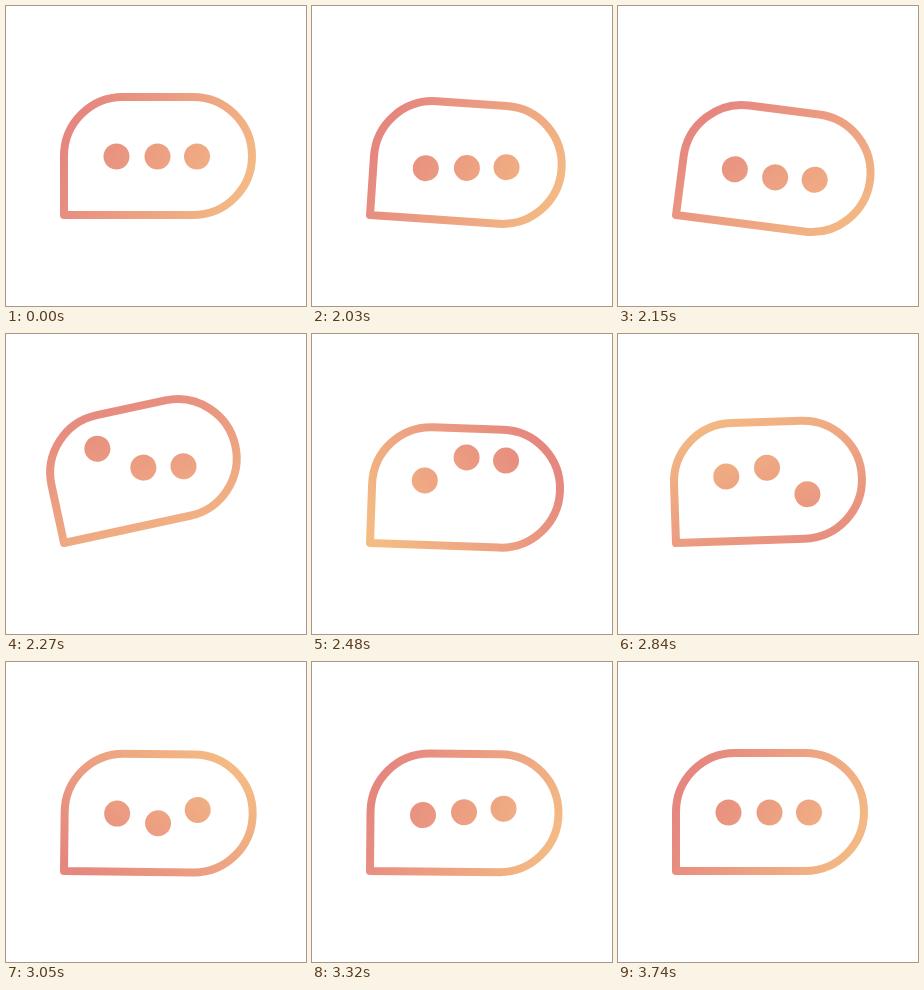
Animation of 300x300 px, one loop 3830 ms. Source, as an HTML page:

```html
<!DOCTYPE html>
<html lang="en">
<head>
<meta charset="utf-8">
<title>Chat bubble</title>
<style>
  html, body { margin: 0; width: 100%; height: 100%; overflow: hidden; background: #fff; }
  svg { display: block; width: 100vw; height: 100vh; }
</style>
</head>
<body>
<svg viewBox="0 0 300 300">
  <defs>
    <linearGradient id="tone" gradientUnits="userSpaceOnUse" x1="57" y1="160" x2="247" y2="160">
      <stop offset="0" stop-color="#e5867f"/>
      <stop offset="1" stop-color="#f4bb84"/>
    </linearGradient>
  </defs>
  <g id="bubble" fill="url(#tone)">
    <path d="M58 209V150A59 59 0 0 1 117 91H187A59 59 0 0 1 187 209Z"
          fill="none" stroke="url(#tone)" stroke-width="8" stroke-linejoin="round"/>
    <circle class="dot" cx="110.5" cy="150.5" r="13"/>
    <circle class="dot" cx="151.5" cy="150.5" r="13"/>
    <circle class="dot" cx="191" cy="150.5" r="13"/>
  </g>
</svg>
<script>
  const LOOP = 3830, START = 2030, END = 3740, STEP = 30;
  const REST_Y = 150.5, DOT_DELAY = 100;
  const SPIN_START = 2090, SPIN_SPEED = 0.3, REST_ANGLE = 25;

  // Times in ms: wind up to `back`, throw to `reach`, then ring around zero until `end`
  const TILT = { start: 1970, windAt: 2110, back: 10, reachAt: 2292, reach: -13,
                 ringAt: 2467, ring: 10.3, half: 200, end: 3617 };
  const HOP = { start: 1720, windAt: 2110, back: 9, reachAt: 2330, reach: -34,
                ringAt: 2499, ring: 27, half: 185, end: 3640 };

  const bubble = document.getElementById('bubble');
  const tone = document.getElementById('tone');
  const dots = [...document.querySelectorAll('.dot')];

  const progress = (t, from, to) => Math.min(1, Math.max(0, (t - from) / (to - from)));
  const ease = p => (1 - Math.cos(Math.PI * p)) / 2;

  function swing(m, t) {
    if (t < m.windAt) return m.back * ease(progress(t, m.start, m.windAt));
    if (t < m.reachAt) return m.back + (m.reach - m.back) * ease(progress(t, m.windAt, m.reachAt));
    if (t < m.ringAt) return m.reach * Math.cos(Math.PI / 2 * progress(t, m.reachAt, m.ringAt));
    const fade = (1 - progress(t, m.ringAt, m.end)) ** 2;
    return m.ring * fade * Math.sin(Math.PI * (t - m.ringAt) / m.half);
  }

  function draw(time) {
    const moving = time >= START && time < END;
    const t = moving ? START + Math.floor((time - START) / STEP) * STEP : 0;
    const spin = Math.min(360, Math.max(0, (t - SPIN_START) * SPIN_SPEED));

    bubble.setAttribute('transform', `rotate(${swing(TILT, t)} 58 209)`);
    tone.setAttribute('gradientTransform', `rotate(${REST_ANGLE + spin} 152 160)`);
    dots.forEach((dot, i) => dot.setAttribute('cy', REST_Y + swing(HOP, t - i * DOT_DELAY)));
  }

  const begin = performance.now();
  function tick() {
    draw((performance.now() - begin) % LOOP);
    requestAnimationFrame(tick);
  }
  tick();
</script>
</body>
</html>
```
